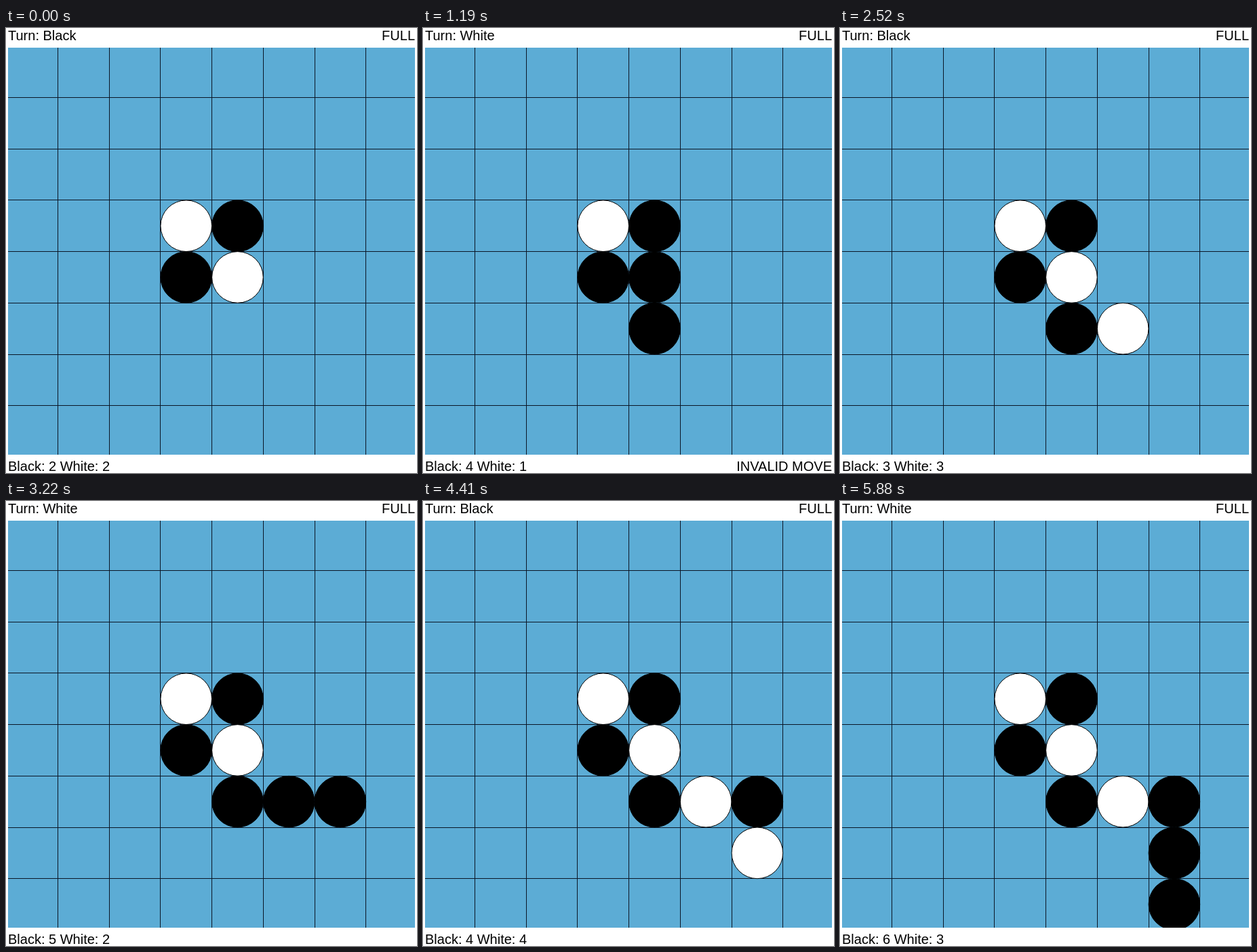
Animation of 606x656 px, one loop 5.95 s. Source, as an HTML page:

```html
<!DOCTYPE html>
<html lang="en">
<head>
<meta charset="utf-8">
<title>Reversi</title>
<style>
  html, body { margin: 0; width: 100%; height: 100%; overflow: hidden; background: #fff; }
  svg { display: block; width: 606px; height: 656px; }
  text { font: 20px "Liberation Sans", Arial, Helvetica, sans-serif; fill: #000; }
  .end { text-anchor: end; }
</style>
</head>
<body>
<svg viewBox="0 0 606 656">
  <clipPath id="edge"><rect x="3" y="29" width="600" height="600"/></clipPath>
  <rect x="3" y="29" width="600" height="600" fill="#5cacd5"/>
  <g id="grid" fill="#0b1626" shape-rendering="crispEdges"></g>
  <g id="discs" clip-path="url(#edge)" stroke="#000"></g>
  <text id="turn" x="3" y="18"></text>
  <text class="end" x="603" y="18">FULL</text>
  <text id="score" x="3" y="653"></text>
  <text id="note" class="end" x="603" y="653"></text>
</svg>
<script>
const LOOP = 5950, CELL = 75.72, LEFT = 0.7, TOP = 26.7;
const $ = id => document.getElementById(id);

const start = [[3, 3, 'White'], [4, 3, 'Black'], [3, 4, 'Black'], [4, 4, 'White']];

// Each event: a placed disc [column, row], or a rejected move
const events = [
  { at: 910, put: [4, 5] },
  { at: 1120, invalid: true },
  { at: 1820, put: [5, 5] },
  { at: 2730, put: [6, 5] },
  { at: 3710, put: [6, 6] },
  { at: 4620, put: [6, 7] }
];

const other = side => side === 'Black' ? 'White' : 'Black';
const key = (x, y) => x + ',' + y;

function place(board, [x, y], side) {
  for (let dx = -1; dx <= 1; dx++) {
    for (let dy = -1; dy <= 1; dy++) {
      if (!dx && !dy) continue;
      const line = [];
      let cx = x + dx, cy = y + dy;
      while (board[key(cx, cy)] === other(side)) {
        line.push(key(cx, cy));
        cx += dx;
        cy += dy;
      }
      if (board[key(cx, cy)] === side) line.forEach(k => board[k] = side);
    }
  }
  board[key(x, y)] = side;
}

function svg(name, attrs, parent) {
  const el = document.createElementNS('http://www.w3.org/2000/svg', name);
  for (const a in attrs) el.setAttribute(a, attrs[a]);
  parent.append(el);
}

function show(step) {
  const board = {};
  let turn = 'Black', note = '';
  for (const [x, y, side] of start) board[key(x, y)] = side;
  for (const e of events.slice(0, step)) {
    note = e.invalid ? 'INVALID MOVE' : '';
    if (e.put) {
      place(board, e.put, turn);
      turn = other(turn);
    }
  }
  const count = side => Object.values(board).filter(s => s === side).length;
  $('turn').textContent = 'Turn: ' + turn;
  $('score').textContent = `Black: ${count('Black')} White: ${count('White')}`;
  $('note').textContent = note;
  $('discs').replaceChildren();
  for (const k in board) {
    const [x, y] = k.split(',').map(Number);
    svg('circle', {
      cx: LEFT + CELL * (x + 0.5),
      cy: TOP + CELL * (y + 0.5),
      r: 37.8,
      fill: board[k].toLowerCase()
    }, $('discs'));
  }
}

for (let i = 1; i < 8; i++) {
  svg('rect', { x: Math.floor(LEFT + CELL * i), y: 29, width: 1, height: 600 }, $('grid'));
  svg('rect', { x: 3, y: Math.floor(TOP + CELL * i), width: 600, height: 1 }, $('grid'));
}

const t0 = performance.now();
let shown = 0;
show(0);

function tick() {
  const t = (performance.now() - t0) % LOOP;
  const step = events.filter(e => e.at <= t).length;
  if (step !== shown) show(shown = step);
  requestAnimationFrame(tick);
}
requestAnimationFrame(tick);
</script>
</body>
</html>
```
